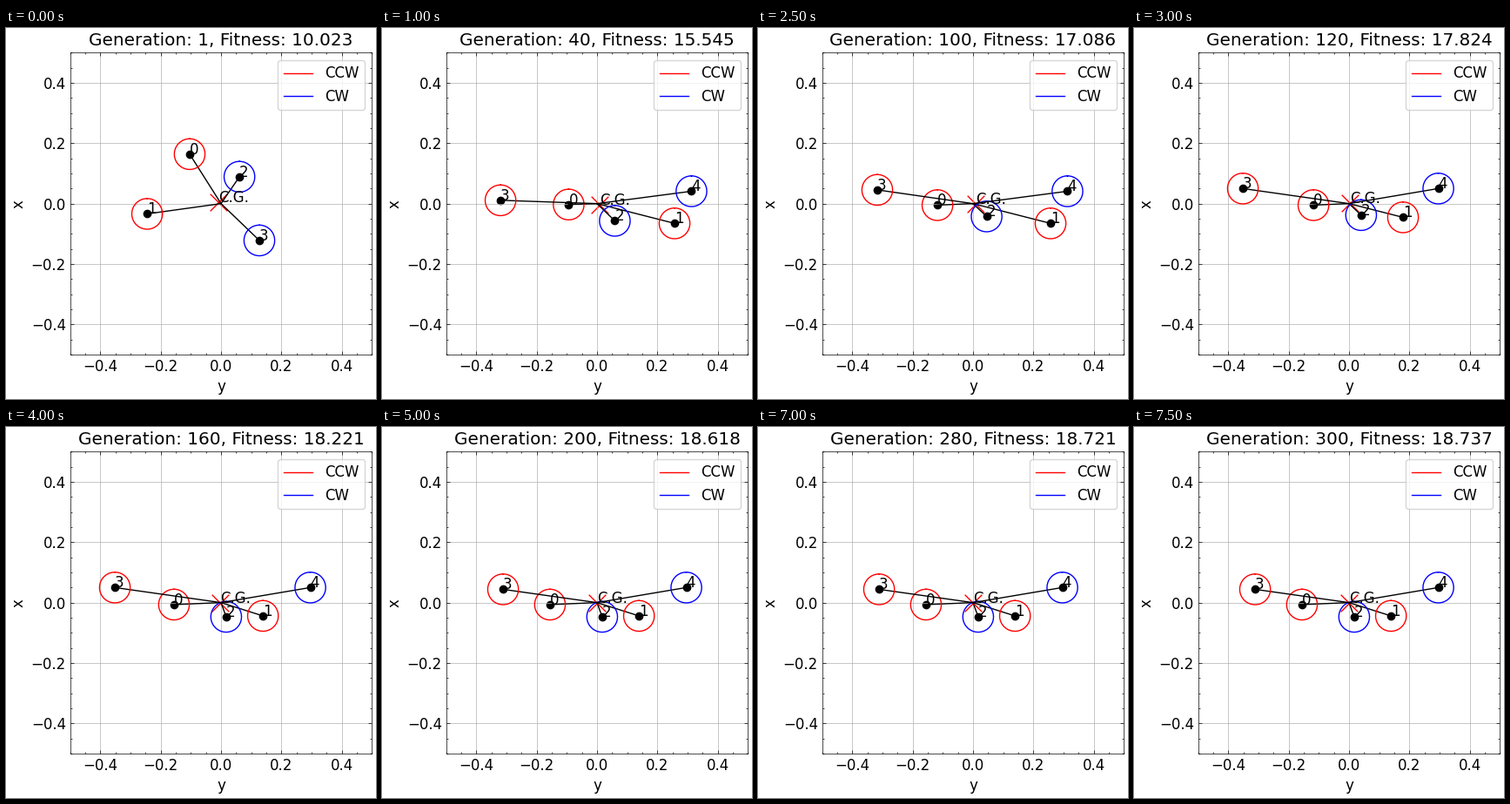
Write a matplotlib script that moves like this. It is 425 px wide and 426 px high and loops after 8 s.

```python
import numpy as np
import matplotlib.pyplot as plt
from matplotlib.animation import FuncAnimation

W, H, DPI = 425, 426, 100
LEFT, BOTTOM, SIDE = 73.75, 51.1, 346.5
STEPS, STEP_MS, GENERATIONS = 16, 500, 20
RADIUS = 0.0508
CG_WEIGHT = 0.045

plt.rcParams.update({
    "font.family": "DejaVu Sans", "font.size": 12,
    "axes.linewidth": 0.5, "lines.linewidth": 1.0,
    "axes.grid": True, "grid.linewidth": 0.5,
})
for axis, far_side in (("xtick", "top"), ("ytick", "right")):
    plt.rcParams.update({
        f"{axis}.direction": "in", f"{axis}.{far_side}": True,
        f"{axis}.minor.visible": True,
        f"{axis}.major.size": 3, f"{axis}.major.width": 0.5,
        f"{axis}.minor.size": 1.5, f"{axis}.minor.width": 0.5,
    })

# Each rotor holds its place until a better one is found: (step, y, x).
TRACKS = [
    [(0, -.104, .164), (1, -.094, -.003), (3, -.118, -.005), (7, -.156, -.0065)],
    [(0, -.245, -.034), (1, .257, -.0655), (6, .179, -.0455), (7, .139, -.044)],
    [(0, .061, .089), (1, .059, -.057), (3, .045, -.0425), (6, .040, -.038),
     (8, .017, -.047)],
    [(0, .127, -.122), (1, -.320, .011), (3, -.3175, .0455), (6, -.352, .050),
     (9, -.3115, .044)],
    [(1, .313, .041), (6, .296, .050)],
]
# Best fitness at a few steps, growing evenly in between.
FITNESS = {0: 10.023, 2: 15.545, 4: 16.347, 6: 17.824,
           10: 18.618, 12: 18.688, 15: 18.737}


def layout(step):
    reached = ([p[1:] for p in track if p[0] <= step] for track in TRACKS)
    return [places[-1] for places in reached if places]


def caption(step):
    fitness = np.interp(step, list(FITNESS), list(FITNESS.values()))
    return f"Generation: {max(1, GENERATIONS * step)}, Fitness: {fitness:.3f}"


fig = plt.figure(figsize=(W / DPI, H / DPI), dpi=DPI, facecolor="white")
ax = fig.add_axes([LEFT / W, BOTTOM / H, SIDE / W, SIDE / H])
ticks = np.linspace(-0.4, 0.4, 5)
ax.set(xlim=(-0.5, 0.5), ylim=(-0.5, 0.5), xticks=ticks, yticks=ticks,
       xlabel="y", ylabel="x")
ax.plot([], [], color="red", label="CCW")
ax.plot([], [], color="blue", label="CW")
ax.legend(loc="upper right")
title = ax.set_title("")

theta = np.linspace(0, 2 * np.pi, 100)
ring_y, ring_x = RADIUS * np.sin(theta), RADIUS * np.cos(theta)
drawn = []


def draw(step):
    while drawn:
        drawn.pop().remove()
    rotors = layout(step)
    clockwise = (2, len(rotors) - 1)
    for i, (y, x) in enumerate(rotors):
        color = "blue" if i in clockwise else "red"
        drawn.extend(ax.plot([0, y], [0, x], color="black"))
        drawn.extend(ax.plot(y + ring_y, x + ring_x, color=color))
        drawn.append(ax.scatter(y, x, s=36, color="black", linewidths=1))
        drawn.append(ax.text(y, x, str(i)))
    cy, cx = CG_WEIGHT * np.sum(rotors, axis=0)
    drawn.append(ax.scatter(cy, cx, s=200, marker="x", color="red", linewidths=1))
    drawn.append(ax.text(cy, cx, "C.G."))
    title.set_text(caption(step))
    return drawn


anim = FuncAnimation(fig, draw, frames=STEPS, init_func=lambda: draw(0),
                     interval=STEP_MS, repeat=True, blit=False)
plt.show()
```
